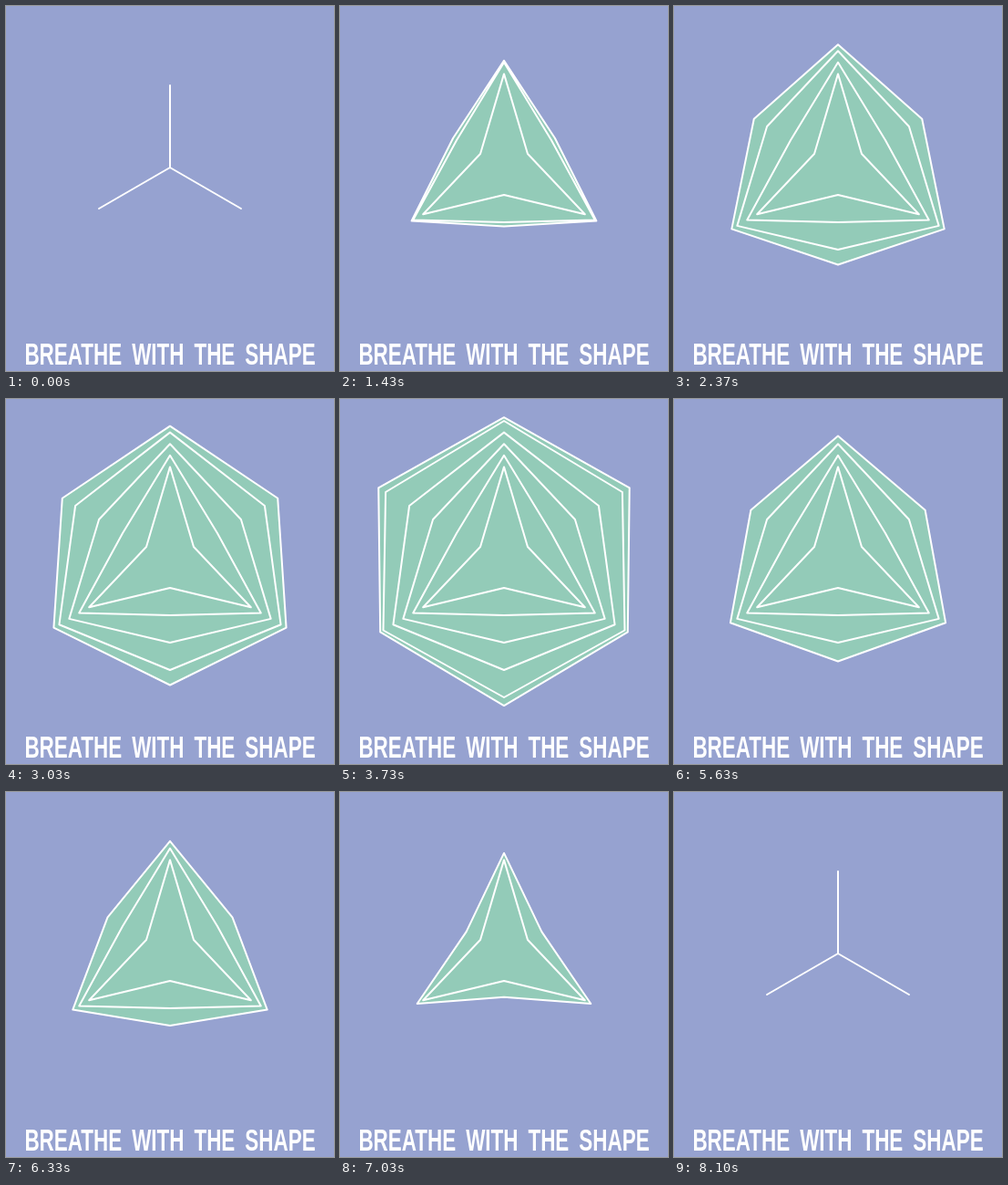
Animation of 360 by 400 pixels, one loop 8260 ms. Source, as an HTML page:

```html
<!DOCTYPE html>
<html lang="en">
<head>
<meta charset="utf-8">
<title>Breathe with the shape</title>
<style>
  html, body { margin: 0; height: 100%; overflow: hidden; background: #96a2d0; }
  svg { display: block; width: 360px; height: 400px; }
  path { fill: #93cbb8; stroke: #fff; stroke-width: 2; stroke-linejoin: round; }
  text { font: bold 33.5px "Liberation Sans", Arial, sans-serif; word-spacing: 7.1px; fill: #fff; text-anchor: middle; }
</style>
</head>
<body>
<svg viewBox="0 0 360 400">
  <path id="shape"/>
  <text transform="translate(180 393) scale(.67 1)">BREATHE WITH THE SHAPE</text>
</svg>
<script>
const LOOP = 8260, FPS = 0.03; // frames per millisecond
const shape = document.getElementById('shape');

// [time, radius of the three folding corners]
const keys = [[0, 0], [3333, 150], [4040, 166], [4750, 150], [8100, 0], [LOOP, 0]];

function radiusAt(t) {
  const i = Math.max(1, keys.findIndex(k => k[0] >= t));
  const [t0, r0] = keys[i - 1], [t1, r1] = keys[i];
  return r0 + (r1 - r0) * (t - t0) / (t1 - t0);
}

// Six corners around the centre: fixed tips alternate with folding corners.
function star(r) {
  const points = [];
  for (let i = 0; i < 6; i++) {
    const radius = i % 2 ? r : 90 + 0.42 * r;
    const a = i * Math.PI / 3;
    points.push(`${(180 + radius * Math.sin(a)).toFixed(2)},${(177 - radius * Math.cos(a)).toFixed(2)}`);
  }
  return `M${points.join('L')}Z`;
}

function draw(now) {
  const frame = Math.floor((now % LOOP + 3.4) * FPS);
  const r = radiusAt(Math.min(frame / FPS, LOOP));
  let d = star(r);
  for (let ring = 30; ring <= 150 && ring < r; ring += 30) d += star(ring);
  shape.setAttribute('d', d);
  requestAnimationFrame(draw);
}
draw(performance.now());
</script>
</body>
</html>
```
